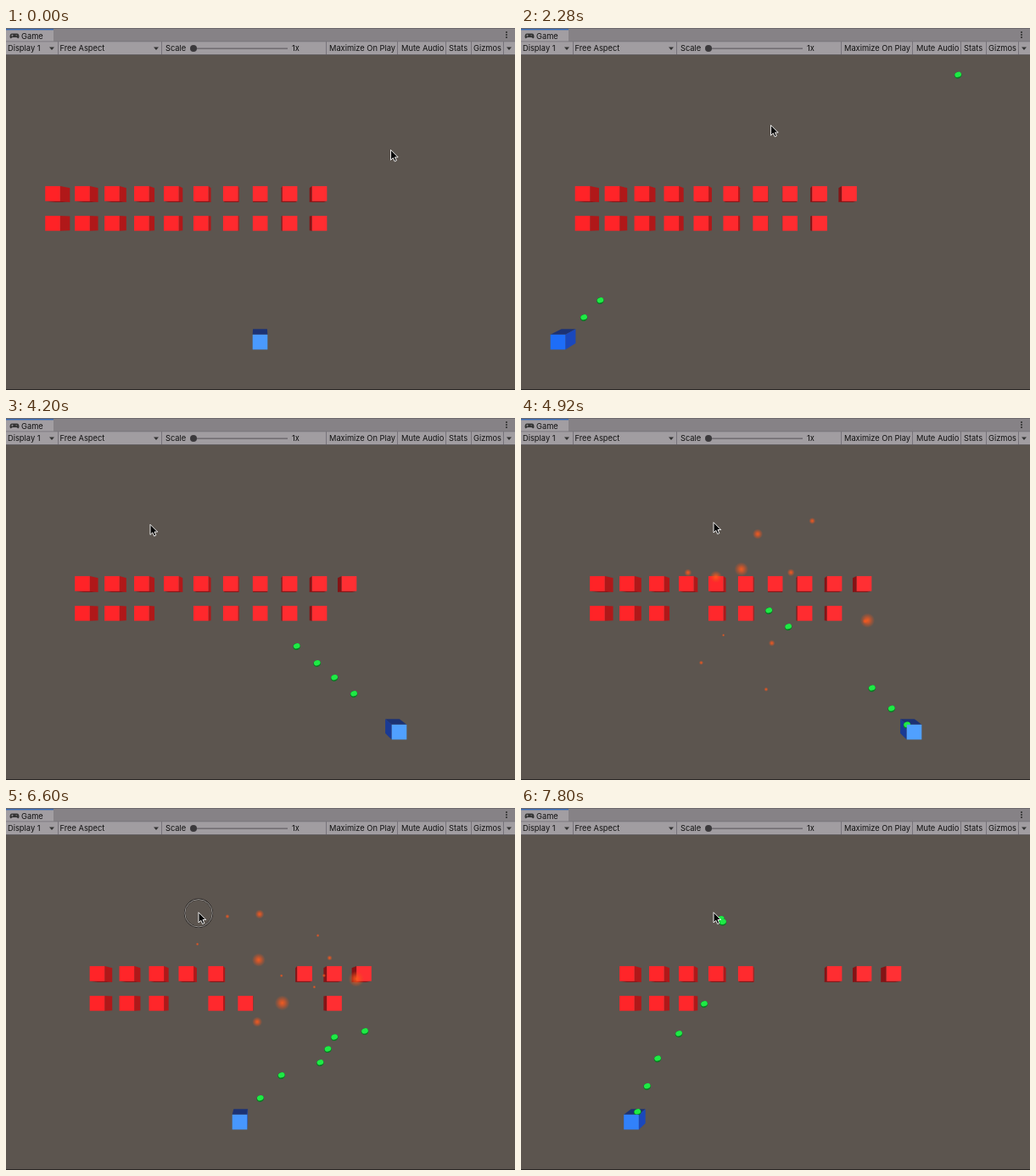
An HTML page that plays this animation: 600x426 px, repeating every 7840 ms.

```html
<!DOCTYPE html>
<html lang="en">
<head>
<meta charset="utf-8">
<title>Shooter preview</title>
<style>
html, body { margin: 0; width: 100%; height: 100%; overflow: hidden; background: #5c554f; }
svg { display: block; width: 100vw; height: 100vh; }
text { font: 9.3px Inter, "Liberation Sans", sans-serif; fill: #111; }
</style>
</head>
<body>
<svg viewBox="0 0 600 426" preserveAspectRatio="none">
  <defs>
    <clipPath id="view"><rect y="32" width="600" height="393"/></clipPath>
    <radialGradient id="spark">
      <stop offset="0" stop-color="#ff5c1c" stop-opacity=".9"/>
      <stop offset=".35" stop-color="#fa561c" stop-opacity=".65"/>
      <stop offset="1" stop-color="#e8501c" stop-opacity="0"/>
    </radialGradient>
    <g id="shot" transform="rotate(-20)">
      <ellipse rx="4.4" ry="3.9" fill="#0a7a22"/>
      <ellipse cx=".3" cy="-.7" rx="3.9" ry="3" fill="#1eea45"/>
    </g>
  </defs>
  <rect width="600" height="426" fill="#5c554f"/>
  <rect y="425" width="600" height="1" fill="#2a2725"/>
  <g id="bar"></g>
  <g id="scene" clip-path="url(#view)"></g>
  <g id="pointer">
    <g id="ring" fill="none">
      <circle cx=".5" cy="1.3" r="16.2" stroke="#23201f" stroke-width="2"/>
      <circle cx=".5" cy="1.3" r="16.2" stroke="#c9c5c1" stroke-width=".7"/>
    </g>
    <path d="M.5.3V12.4L3.3 9.8L5.2 14L7.3 13L5.5 9H9.2Z" fill="#080808" stroke="#fff" stroke-width=".9"/>
  </g>
</svg>
<script>
const LOOP = 7840, FRAME = 40;
const ROWS = 2, COLS = 10, STEP = 34.95, HALF = 8.8, PLAYER_Y = 369.6;
const VANISH = { x: 299.5, y: 228 }, DEPTH = 0.951, MID_DEPTH = 0.975;
const SHOT_SPEED = 0.1715, MUZZLE_Y = 366, REACH = 5, HITS_TO_KILL = 2;
const MARCH_START = 1400, MARCH_PERIOD = 1940;
const BLAST_LIFE = 400, BLAST_SPREAD = 260, SPARKS = 12;
const RING_FROM = 5000, RING_TO = 7200;

// Key points of the player's and the pointer's paths: [time, ...position]
const playerPath = [[950, 299.5], [1800, 43.5], [2300, 43.5], [3280, 463.5], [5150, 463.5], [5396, 550],
  [5510, 577.5], [5560, 577], [5775, 496], [6105, 427], [6266, 352], [6452, 308], [6600, 275.5],
  [6700, 285], [7010, 200], [7195, 154], [7340, 130]];
const pointerPath = [[1000, 453, 145], [1800, 294, 114], [2300, 294, 114],
  [3200, 169.5, 125], [4250, 169.5, 125], [4480, 226.5, 122.5]];
const triggers = [76, 395, 665, 1915, 2077, 3315, 3497, 3652, 3826, 4535, 4729, 4883, 5060, 5396,
  5569, 5774, 5943, 6105, 6266, 6452, 6650, 7009, 7194, 7359, 7562, 7750];

const $ = id => document.getElementById(id);
const rect = (x, y, w, h, fill) => `<rect x="${x}" y="${y}" width="${w}" height="${h}" fill="${fill}"/>`;
const mix = (a, b, p) => `rgb(${a.map((v, i) => Math.round(v + (b[i] - v) * p))})`;

function along(path, t) {
  const i = path.findIndex(key => key[0] > t);
  if (i === 0) return path[0].slice(1);
  if (i < 0) return path[path.length - 1].slice(1);
  const [a, b] = [path[i - 1], path[i]], p = (t - a[0]) / (b[0] - a[0]);
  return a.slice(1).map((v, n) => v + (b[n + 1] - v) * p);
}

function seeded(seed) {
  return () => {
    seed = (seed * 16807) % 2147483647;
    return seed / 2147483647;
  };
}

// Game rules
const marches = t => Math.max(0, Math.floor((t - MARCH_START) / MARCH_PERIOD) + 1);
const columnX = (col, t) => 55 + STEP * (col + marches(t) / 2);
const rowY = row => 194.9 + STEP * row;

const cubes = Array.from({ length: ROWS * COLS }, (_, i) =>
  ({ row: Math.floor(i / COLS), col: i % COLS, hits: 0, end: Infinity }));

const shots = triggers.map(start => {
  const x = VANISH.x + (along(playerPath, start)[0] - VANISH.x) * MID_DEPTH;
  const [aimX, aimY] = along(pointerPath, start);
  const k = SHOT_SPEED / Math.hypot(aimX - x, aimY - MUZZLE_Y);
  return { start, x, vx: (aimX - x) * k, vy: (aimY - MUZZLE_Y) * k, end: Infinity };
});
const isLive = (item, t) => t >= (item.start || 0) && t < item.end;
const shotAt = (s, t) => [s.x + s.vx * (t - s.start), MUZZLE_Y + s.vy * (t - s.start)];

// Play the round once to learn when shots and cubes vanish
for (let t = 0; t < LOOP; t += 5) {
  for (const shot of shots.filter(s => isLive(s, t))) {
    const [x, y] = shotAt(shot, t);
    const cube = cubes.find(c => isLive(c, t) &&
      Math.abs(columnX(c.col, t) - x) < HALF + REACH && Math.abs(rowY(c.row) - y) < HALF + REACH);
    if (!cube) continue;
    shot.end = t;
    if (++cube.hits === HITS_TO_KILL) cube.end = t;
  }
}

const blasts = cubes.filter(c => c.end < LOOP).map(c => {
  const random = seeded(c.row * 977 + c.col * 131 + 7);
  const sparks = Array.from({ length: SPARKS }, () => {
    const angle = random() * Math.PI * 2, distance = 100 * Math.sqrt(random());
    return { dx: Math.cos(angle) * distance, dy: Math.sin(angle) * distance, r: 2 + 9 * random() ** 2 };
  });
  return { x: columnX(c.col, c.end), y: rowY(c.row), start: c.end, end: c.end + BLAST_LIFE, sparks };
});

// Drawing
function drawCube(x, y, fill, shade, between = '') {
  const back = ([px, py]) => [VANISH.x + (px - VANISH.x) * DEPTH, VANISH.y + (py - VANISH.y) * DEPTH];
  const l = x - HALF, r = x + HALF, top = y - HALF, bottom = y + HALF;
  const side = (a, b, color) => `<polygon points="${[a, b, back(b), back(a)].join(' ')}" fill="${color}"/>`;
  let out = '';
  if (top > VANISH.y) out += side([l, top], [r, top], shade.flat);
  if (bottom < VANISH.y) out += side([l, bottom], [r, bottom], shade.flat);
  if (r < VANISH.x) out += side([r, top], [r, bottom], shade.right);
  if (l > VANISH.x) out += side([l, top], [l, bottom], shade.left);
  return out + between + rect(l, top, HALF * 2, HALF * 2, fill);
}

const red = { flat: '#8c1416', right: '#b01819', left: '#841315' };
const blue = { flat: '#1c3274', right: '#1a48bc', left: '#1a3a94' };

const drawEnemies = t => cubes.filter(c => isLive(c, t)).map(c => {
  const x = columnX(c.col, t);
  return drawCube(x, rowY(c.row), mix([255, 32, 36], [255, 48, 52], x / 440), red);
}).join('');

const drawShots = t => shots.filter(s => isLive(s, t)).map(s =>
  `<use href="#shot" transform="translate(${shotAt(s, t)})"/>`).join('');

const drawBlasts = t => blasts.filter(b => isLive(b, t)).map(b => {
  const p = (t - b.start) / BLAST_SPREAD;
  const size = Math.sqrt((b.end - t) / (BLAST_LIFE - BLAST_SPREAD));
  return b.sparks.map(s =>
    `<circle cx="${b.x + s.dx * p}" cy="${b.y + s.dy * p}" r="${s.r * size}" fill="url(#spark)"/>`).join('');
}).join('');

function draw(t) {
  const [px] = along(playerPath, t);
  const glow = 1 - ((px - 440) / 400) ** 2;
  $('scene').innerHTML = drawEnemies(t) +
    drawCube(px, PLAYER_Y, mix([28, 108, 248], [80, 160, 255], glow), blue, drawShots(t)) +
    drawBlasts(t);
  const [mx, my] = along(pointerPath, t);
  $('pointer').setAttribute('transform', `translate(${mx} ${my - (my > 140 ? 2 : 0)})`);
  $('ring').style.display = t >= RING_FROM && t < RING_TO ? '' : 'none';
}

function drawToolbar() {
  const arrow = x => `<path d="M${x - 3} 22.5h6l-3 3.5z" fill="#333"/>`;
  const labels = { 2: 'Display 1', 63.5: 'Free Aspect', 188: 'Scale', 337: '1x', 381: 'Maximize On Play',
    466: 'Mute Audio', 522: 'Stats', 551: 'Gizmos' };
  $('bar').innerHTML =
    rect(0, 0, 600, 16, '#868286') + rect(0, 0, 600, 1, '#6c696c') +
    rect(0, 1, 56, 15, '#a29ea2') + rect(0, 1, 56, 1.4, '#3468b4') +
    rect(0, 16, 600, 15, '#a19da1') + rect(0, 15.5, 600, .8, '#77747a') + rect(0, 31, 600, 1, '#625e60') +
    [61, 183, 377, 461, 518, 548, 586].map(x => rect(x, 16, 1, 15, '#77737a')).join('') +
    '<path d="M7 6.5h6q2.5 0 2.5 4q-.5 3-3 .5h-5q-2.5 2.5-3-.5q0-4 2.5-4z" fill="#333"/>' +
    '<path d="M6.2 8.8h2.4M7.4 7.6v2.4M11.5 8.8h1.6" stroke="#a29ea2" stroke-width=".7"/>' +
    [5, 8, 11].map(y => `<circle cx="590" cy="${y}" r=".9" fill="#222"/>`).join('') +
    [54, 177, 593].map(arrow).join('') +
    rect(222, 23.6, 110, 1, '#555257') + '<circle cx="221" cy="24" r="4" fill="#3c3a3d"/>' +
    '<text x="18" y="12.7">Game</text>' +
    Object.entries(labels).map(([x, s]) => `<text x="${x}" y="27.3">${s}</text>`).join('');
}

drawToolbar();
const begin = performance.now();
function tick() {
  const t = Math.max(0, performance.now() - begin) % LOOP;
  draw(Math.floor(t / FRAME) * FRAME);
  requestAnimationFrame(tick);
}
tick();
</script>
</body>
</html>
```
